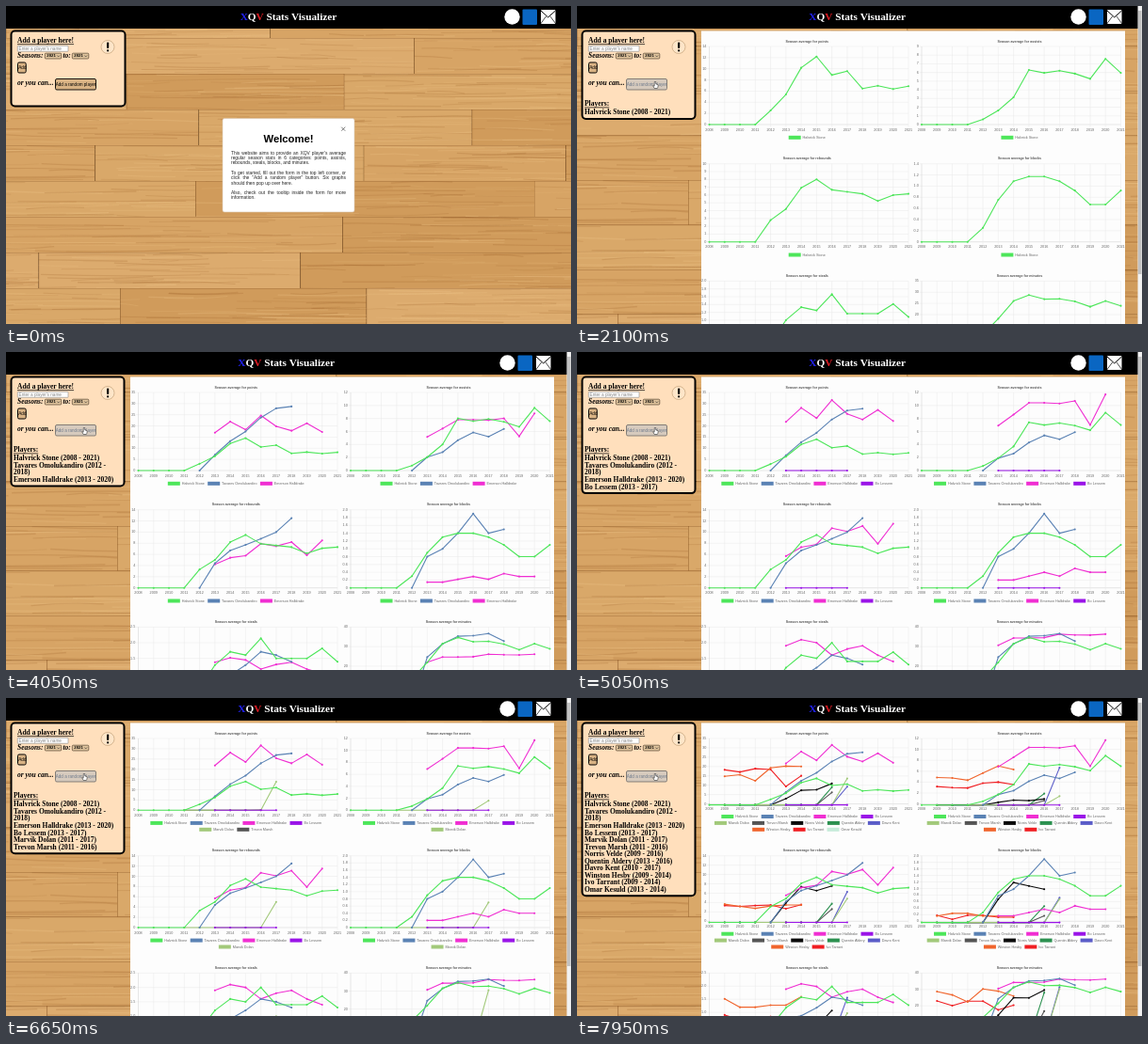
Recreate the animation shown at these times as an HTML page with a canvas. Size 600 by 338 pixels, loop 8000 ms.

```html
<!DOCTYPE html>
<html lang="en">
<head>
<meta charset="utf-8">
<title>Stats Visualizer</title>
<style>
html, body { margin: 0; width: 100%; height: 100%; overflow: hidden; background: #000; }
canvas { display: block; width: 600px; height: 338px; }
</style>
</head>
<body>
<canvas id="stage" width="600" height="338"></canvas>
<script>
const W = 600, H = 338, LOOP = 8000;
const ctx = document.getElementById('stage').getContext('2d');
const SERIF = '"Liberation Serif", "Times New Roman", serif';
const SANS = '"Liberation Sans", Arial, sans-serif';

const FADE = [50, 450], MOVE = [850, 1050], PANEL_AT = 1550, BLACK = [1600, 1700];
const FIRST_YEAR = 2008, YEARS = 14, YEAR_STEP = 16.27;
const DELAYS = [0, 22, 29, 36, 40, 44];

// One value list per chart, aligned to the last season; earlier seasons are zero.
const player = (name, from, to, color, start, stats = []) => ({ name, from, to, color, start, stats });
const players = [
  player('Halvrick Stone', 2008, 2021, '#4de65a', 1700, [
    [2.9, 6.2, 11.7, 14, 10.2, 11, 7.4, 8, 7.3, 7.9],
    [0.7, 1.9, 3.7, 7.4, 7, 7.3, 6.9, 6.2, 8.9, 7],
    [3.3, 5, 8.2, 9.5, 7.9, 7.6, 7.3, 6.2, 7.1, 7.3],
    [0.3, 0.9, 1.3, 1.4, 1.4, 1.3, 1.1, 0.8, 0.8, 1.1],
    [0.5, 1.2, 1.6, 1.5, 2, 1.4, 1.4, 1.4, 1.7, 1.3],
    [13.4, 21.9, 31.5, 34.7, 32.5, 32.7, 31.3, 28.4, 31.5, 28.9]]),
  player('Tavares Omolukandiro', 2012, 2018, '#5a82b4', 2804, [
    [6.8, 12.7, 16.9, 22.9, 26.9, 27.7],
    [1.9, 2.6, 4.3, 5.4, 4.8, 5.9],
    [4.4, 6.7, 7.7, 8.8, 10, 12.5],
    [0.8, 1, 1.4, 1.9, 1.4, 1.5],
    [0.8, 0.9, 1.2, 1.6, 1.5, 1.3],
    [24.6, 31.4, 35.3, 35.6, 36.7, 32.8]]),
  player('Emerson Halldrake', 2013, 2020, '#f02ed2', 3735, [
    [21.8, 28.1, 23.5, 31.6, 25.4, 22.9, 27.2, 22.2],
    [6.9, 8.6, 10.4, 10.4, 10.3, 10.7, 7, 11.7],
    [5.7, 7.3, 7.8, 10.7, 10.1, 11.1, 7.9, 11.5],
    [0.2, 0.2, 0.3, 0.4, 0.3, 0.5, 0.4, 0.4],
    [1.9, 2.1, 2, 1.6, 1.8, 1.9, 1.6, 1.4],
    [30.7, 34.4, 34.4, 34.6, 36.4, 36, 35.9, 36.4]]),
  player('Bo Lessem', 2013, 2017, '#9a14e8', 4600),
  player('Marvik Dolan', 2011, 2017, '#a2c97a', 5750, [13.9, 1.6, 5, 0.7, 1, 30.5]),
  player('Trevon Marsh', 2011, 2016, '#555555', 6645, [6.6, 0.8, 2.8, 0.2, 0.4, 17.2]),
  player('Norris Velde', 2009, 2016, '#0a0a0a', 6880, [
    [3.3, 7.7, 8, 11.3], [0.5, 0.9, 0.8, 1.1], [4.1, 7.5, 6.7, 7.7],
    [0.7, 1.2, 1.1, 1], [0.5, 0.5, 0.5, 1.1], [14.8, 25.3, 25.2, 29.9]]),
  player('Quentin Aldery', 2013, 2016, '#2c9150', 7110, [9.4, 2.1, 4, 0.5, 0.6, 28.8]),
  player('Davro Kent', 2010, 2017, '#5a5cc8', 7340, [10.2, 7.2, 6.9, 0.8, 1.7, 34.2]),
  player('Winston Hesby', 2009, 2014, '#f0642c', 7580, [
    [17.5, 18.6, 14.7, 22.9, 24, 23.8], [5.9, 5.8, 5.3, 6.9, 8.5, 7.7],
    [4.5, 3.9, 3.4, 4, 4.3, 4.3], [0.2, 0.3, 0.3, 0.2, 0.2, 0.2],
    [1.9, 1.5, 1.5, 1.6, 1.6, 2], [36.2, 33.6, 28.2, 38.2, 36.5, 32.7]]),
  player('Ivo Tarrant', 2009, 2014, '#f01e22', 7705, [
    [27, 25.3, 27.9, 27.3, 13.8, 22.3], [5, 4.7, 4.6, 6, 6.3, 5.6],
    [5.4, 5.1, 5.4, 5.6, 4.3, 5.7], [0.3, 0.1, 0.3, 0.3, 0.2, 0.2],
    [1.5, 1.2, 1.2, 1.4, 1.2, 1.3], [38.8, 33.9, 38.5, 38.6, 29.5, 34.5]]),
  player('Omar Kesuld', 2013, 2014, '#c6ecda', 7942)
];

// [max, step] of the value axis with one, two, and three or more players
const charts = [
  { name: 'points', axes: [[14, 2], [30, 5], [35, 5]] },
  { name: 'assists', axes: [[9, 1], [9, 1], [12, 2]] },
  { name: 'rebounds', axes: [[10, 1], [14, 2], [14, 2]] },
  { name: 'blocks', axes: [[1.4, 0.2], [2, 0.2], [2, 0.2]] },
  { name: 'steals', axes: [[2, 0.2], [2, 0.2], [2.5, 0.5]] },
  { name: 'minutes', axes: [[35, 5], [40, 10], [40, 10]] }
];
charts.forEach((c, i) => Object.assign(c, {
  index: i, x: i % 2 ? 366 : 140.5, mid: i % 2 ? 470 : 244.3,
  y: Math.floor(i / 2) * 124.7, delay: DELAYS[i]
}));

const clamp = v => Math.max(0, Math.min(1, v));
const mix = (a, b, p) => a + (b - a) * p;
const outQuart = p => 1 - (1 - clamp(p)) ** 4;
const span = (t, [a, b]) => clamp((t - a) / (b - a));

function text(str, x, y, font, color = '#000', align = 'left') {
  ctx.font = font;
  ctx.fillStyle = color;
  ctx.textAlign = align;
  ctx.textBaseline = 'middle';
  ctx.fillText(str, x, y);
}

function line(x1, y1, x2, y2, color, width) {
  ctx.strokeStyle = color;
  ctx.lineWidth = width;
  ctx.beginPath();
  ctx.moveTo(x1, y1);
  ctx.lineTo(x2, y2);
  ctx.stroke();
}

function box(x, y, w, h, r, fill, stroke, width = 1) {
  ctx.beginPath();
  ctx.roundRect(x, y, w, h, r);
  ctx.fillStyle = fill;
  ctx.fill();
  if (!stroke) return;
  ctx.strokeStyle = stroke;
  ctx.lineWidth = width;
  ctx.stroke();
}

function underlined(str, x, y, font) {
  text(str, x, y, font);
  line(x, y + 3.3, x + ctx.measureText(str).width, y + 3.3, '#000', 0.7);
}

function makeWood(scale) {
  const canvas = document.createElement('canvas');
  canvas.width = W;
  canvas.height = H;
  const g = canvas.getContext('2d');
  let seed = 11;
  const rand = () => (seed = seed * 16807 % 2147483647) / 2147483647;
  const tones = ['#d7a465', '#dcab6e', '#d09b5b', '#d9a869'];
  g.scale(scale, scale);
  for (let row = 0; row < 9; row++) {
    const top = -4 + 38 * row;
    let x = -rand() * 200;
    while (x < W) {
      const w = 200 + rand() * 180;
      g.save();
      g.beginPath();
      g.rect(x, top, w, 38);
      g.clip();
      g.fillStyle = tones[Math.floor(rand() * 4)];
      g.fillRect(x, top, w, 38);
      for (let i = 0; i < 34; i++) {
        const gx = x + rand() * w - 40, gy = top + rand() * 38, len = 30 + rand() * 150;
        g.strokeStyle = rand() < 0.6 ? 'rgba(150,92,38,.2)' : 'rgba(240,200,140,.25)';
        g.lineWidth = 0.4 + rand();
        g.beginPath();
        g.moveTo(gx, gy);
        g.quadraticCurveTo(gx + len / 2, gy + rand() * 6 - 3, gx + len, gy + rand() * 4 - 2);
        g.stroke();
      }
      g.restore();
      g.fillStyle = 'rgba(120,70,25,.4)';
      g.fillRect(x, top, w, 0.6);
      g.fillRect(x, top, 0.6, 38);
      x += w;
    }
  }
  return canvas;
}
const shortWood = makeWood(1), tallWood = makeWood(1.25);

function drawHeader(mid) {
  ctx.fillStyle = '#000';
  ctx.fillRect(0, 0, W, 24);
  const font = `bold 11.25px ${SERIF}`;
  const parts = [['X', '#2222f0'], ['Q', '#fff'], ['V', '#e01c24'], [' Stats Visualizer', '#fff']];
  ctx.font = font;
  let x = mid - ctx.measureText('XQV Stats Visualizer').width / 2;
  for (const [str, color] of parts) {
    text(str, x, 12.5, font, color);
    x += ctx.measureText(str).width;
  }
  const dx = mid < 300 ? -5 : 0;
  ctx.fillStyle = '#fff';
  ctx.beginPath();
  ctx.arc(537.5 + dx, 11.5, 8.2, 0, 7);
  ctx.fill();
  box(548.5 + dx, 3.5, 15.5, 16.5, 1, '#0a66c2');
  box(568 + dx, 4, 15.5, 15, 1, '#fff');
  line(568 + dx, 5, 575.7 + dx, 12, '#000', 1);
  line(575.7 + dx, 12, 583.5 + dx, 5, '#000', 1);
  line(568 + dx, 18.5, 573.5 + dx, 11, '#000', 0.7);
  line(583.5 + dx, 18.5, 578 + dx, 11, '#000', 0.7);
}

function drawSelect(x) {
  box(x, 50.2, 17.5, 5.8, 1, '#dfc39c', '#554633', 0.7);
  text('2021', x + 2, 53.3, `bold 4.3px ${SANS}`);
  line(x + 13, 52.5, x + 14.4, 54, '#222', 0.6);
  line(x + 14.4, 54, x + 15.8, 52.5, '#222', 0.6);
}

function drawForm(listed, wide, hover) {
  const lines = listed.flatMap(p => {
    const seasons = `(${p.from} - ${p.to})`;
    return p === players[1] ? [`${p.name} (${p.from} -`, `${p.to})`] : [`${p.name} ${seasons}`];
  });
  const bottom = lines.length ? 112.5 + 7.52 * lines.length : 106.5;
  box(5.5, 26.5, wide ? 121 : 120, bottom - 26.5, 4, '#ffdfbc', '#000', 2);
  const bold = `bold 7.5px ${SERIF}`, slanted = `italic bold 7.5px ${SERIF}`;
  underlined('Add a player here!', 12, 37.3, bold);
  box(12.3, 42.3, 53.7, 6, 0.5, '#fff', '#8a8a8a', 0.6);
  text("Enter a player's name", 13.5, 45.4, `4.7px ${SANS}`, '#858585');
  text('Seasons:', 12, 52.8, slanted);
  drawSelect(41.3);
  text('to:', 60.5, 52.8, slanted);
  drawSelect(70.3);
  box(12.5, 60, 8.7, 11, 1.5, '#d9b384', '#000', 1);
  text('Add', 13.2, 65.6, `4.7px ${SANS}`);
  text('or you can...', 12, 82.5, slanted);
  box(52.5, 77.5, 43, 11.5, 1.5, hover ? '#d6cabd' : '#d9b384', hover ? '#77736f' : '#000', 0.9);
  text('Add a random player', 74, 83.4, `4.6px ${SANS}`, hover ? '#6f7b8c' : '#000', 'center');
  ctx.beginPath();
  ctx.arc(108, 43.5, 7, 0, 7);
  ctx.fillStyle = '#ffe6c9';
  ctx.fill();
  ctx.strokeStyle = '#c9a982';
  ctx.lineWidth = 0.8;
  ctx.stroke();
  box(107, 38.5, 2.2, 6.6, 1, '#000');
  box(107, 46.3, 2.2, 2.2, 1.1, '#000');
  if (!lines.length) return;
  underlined('Players:', 8, 104.5, bold);
  lines.forEach((str, i) => text(str, 8, 113.5 + 7.52 * i, bold));
}

function justified(str, x, y, width, font) {
  const words = str.split(' ');
  ctx.font = font;
  const used = words.reduce((sum, w) => sum + ctx.measureText(w).width, 0);
  const gap = (width - used) / (words.length - 1);
  for (const word of words) {
    text(word, x, y, font, '#222');
    x += ctx.measureText(word).width + gap;
  }
}

function drawWelcome(alpha) {
  const paragraphs = [
    ["This website aims to provide an XQV player's average",
     'regular season stats in 6 categories: points, assists,',
     'rebounds, steals, blocks, and minutes.'],
    ['To get started, fill out the form in the top left corner, or',
     'click the "Add a random player" button. Six graphs',
     'should then pop up over here.'],
    ['Also, check out the tooltip inside the form for more', 'information.']
  ];
  const font = `4.9px ${SANS}`;
  ctx.globalAlpha = alpha;
  box(230, 119.5, 140, 99.5, 2, '#fff', '#d8c7b0', 0.6);
  line(356.2, 128.7, 360.2, 132.7, '#555', 0.8);
  line(360.2, 128.7, 356.2, 132.7, '#555', 0.8);
  text('Welcome!', 300, 141.7, `bold 11.3px ${SANS}`, '#000', 'center');
  paragraphs.forEach((rows, p) => rows.forEach((str, i) => {
    const y = 156.2 + p * 21.2 + i * 5.4;
    if (i < rows.length - 1) justified(str, 239, y, 122, font);
    else text(str, 239, y, font, '#222');
  }));
  ctx.globalAlpha = 1;
}

const legendRows = n => n <= 4 ? 1 : n <= 9 ? 2 : 3;

function scaleFor(chart, count) {
  const [max, step] = chart.axes[Math.min(count, 3) - 1];
  const top = chart.y + 43, bottom = chart.y + 126 - 6.7 * (legendRows(count) - 1);
  return { max, step, top, bottom, at: v => bottom - v / max * (bottom - top) };
}

// Follows a point through each rescale, restarting when its goal moves.
function animatedY(chart, value, first, count, t) {
  let from, to, start;
  for (let k = first; k < count; k++) {
    const scale = scaleFor(chart, k + 1), goal = scale.at(value), when = players[k].start + chart.delay;
    if (goal === to) continue;
    from = k === first ? scale.bottom : mix(from, to, outQuart((when - start) / 1000));
    to = goal;
    start = when;
  }
  return mix(from, to, outQuart((t - start) / 1000));
}

function drawLegend(chart, shown) {
  const font = `3.75px ${SANS}`, rows = [shown.slice(0, 4), shown.slice(4, 9), shown.slice(9)];
  const total = legendRows(shown.length);
  ctx.font = font;
  const itemWidth = p => 15 + ctx.measureText(p.name).width;
  rows.slice(0, total).forEach((row, i) => {
    const width = row.reduce((sum, p) => sum + itemWidth(p) + 3.2, -3.2);
    const y = chart.y + 139.8 - 6.9 * (total - 1 - i);
    let x = chart.mid - width / 2;
    for (const p of row) {
      box(x, y - 2, 13, 4, 0, p.color);
      text(p.name, x + 14.9, y, font, '#666');
      x += itemWidth(p) + 3.2;
    }
  });
}

function drawChart(chart, t) {
  const shown = players.filter(p => t >= p.start + chart.delay);
  const count = shown.length;
  if (!count) return;
  const scale = scaleFor(chart, count), { x, y } = chart;
  const right = x + YEAR_STEP * (YEARS - 1), small = `3.75px ${SANS}`;
  text(`Season average for ${chart.name}`, chart.mid, y + 37.6, `bold 3.65px ${SANS}`, '#555', 'center');
  for (let i = 0; i <= Math.round(scale.max / scale.step); i++) {
    const v = i * scale.step, gy = scale.at(v);
    line(x - 2.5, gy, right, gy, i ? '#e9e9e9' : '#cfcfcf', 0.5);
    text(v && scale.max < 3 ? v.toFixed(1) : v, x - 3.2, gy, small, '#666', 'right');
  }
  for (let i = 0; i < YEARS; i++) {
    const gx = x + i * YEAR_STEP;
    line(gx, scale.top, gx, scale.bottom + 2.5, i ? '#e9e9e9' : '#cfcfcf', 0.5);
    text(FIRST_YEAR + i, gx, scale.bottom + 5.6, small, '#666', 'center');
  }
  drawLegend(chart, shown);
  for (let k = count - 1; k >= 0; k--) {
    const p = shown[k], tail = [].concat(p.stats[chart.index] ?? 0);
    const length = p.to - p.from + 1, lead = length - tail.length;
    const points = Array.from({ length }, (_, i) => [
      x + (p.from - FIRST_YEAR + i) * YEAR_STEP,
      animatedY(chart, i < lead ? 0 : tail[i - lead], k, count, t)
    ]);
    ctx.strokeStyle = ctx.fillStyle = p.color;
    ctx.lineWidth = 1.1;
    ctx.lineJoin = 'round';
    ctx.beginPath();
    points.forEach(pt => ctx.lineTo(...pt));
    ctx.stroke();
    for (const [px, py] of points) {
      ctx.beginPath();
      ctx.arc(px, py, 1.05, 0, 7);
      ctx.fill();
    }
  }
}

function drawHand(x, y) {
  ctx.beginPath();
  ctx.moveTo(x - 0.7, y);
  [[0.7, 0], [0.8, 2.4], [3.2, 3.2], [3, 5.6], [2.3, 7], [-0.8, 7], [-2.4, 4.2], [-0.8, 4.6]]
    .forEach(([dx, dy]) => ctx.lineTo(x + dx, y + dy));
  ctx.closePath();
  ctx.fillStyle = '#fff';
  ctx.fill();
  ctx.strokeStyle = '#333';
  ctx.lineWidth = 0.6;
  ctx.stroke();
}

function draw(t) {
  if (t >= BLACK[0] && t < BLACK[1]) {
    ctx.fillStyle = '#000';
    ctx.fillRect(0, 0, W, H);
    return;
  }
  const expanded = t >= PANEL_AT, moved = span(t, MOVE);
  ctx.drawImage(expanded ? tallWood : shortWood, 0, 0);
  drawHeader(expanded ? 297.7 : 300);
  if (expanded) {
    box(132, 26.5, 450, H, 0, '#fdfdfd');
    charts.forEach(chart => drawChart(chart, t));
    box(595.5, 0, 4.5, H, 0, '#f1f1f1');
    box(596, 5, 3.5, 280, 0, '#c1c1c1');
  }
  drawForm(players.filter(p => t >= p.start), !expanded, moved === 1);
  const fade = 1 - span(t, FADE);
  if (fade > 0) drawWelcome(fade);
  if (t >= FADE[0]) drawHand(mix(358, 83, moved), mix(131, 80.5, moved));
}

let origin;
function tick(now) {
  origin ??= now;
  draw((now - origin) % LOOP);
  requestAnimationFrame(tick);
}
draw(0);
requestAnimationFrame(tick);
</script>
</body>
</html>
```
